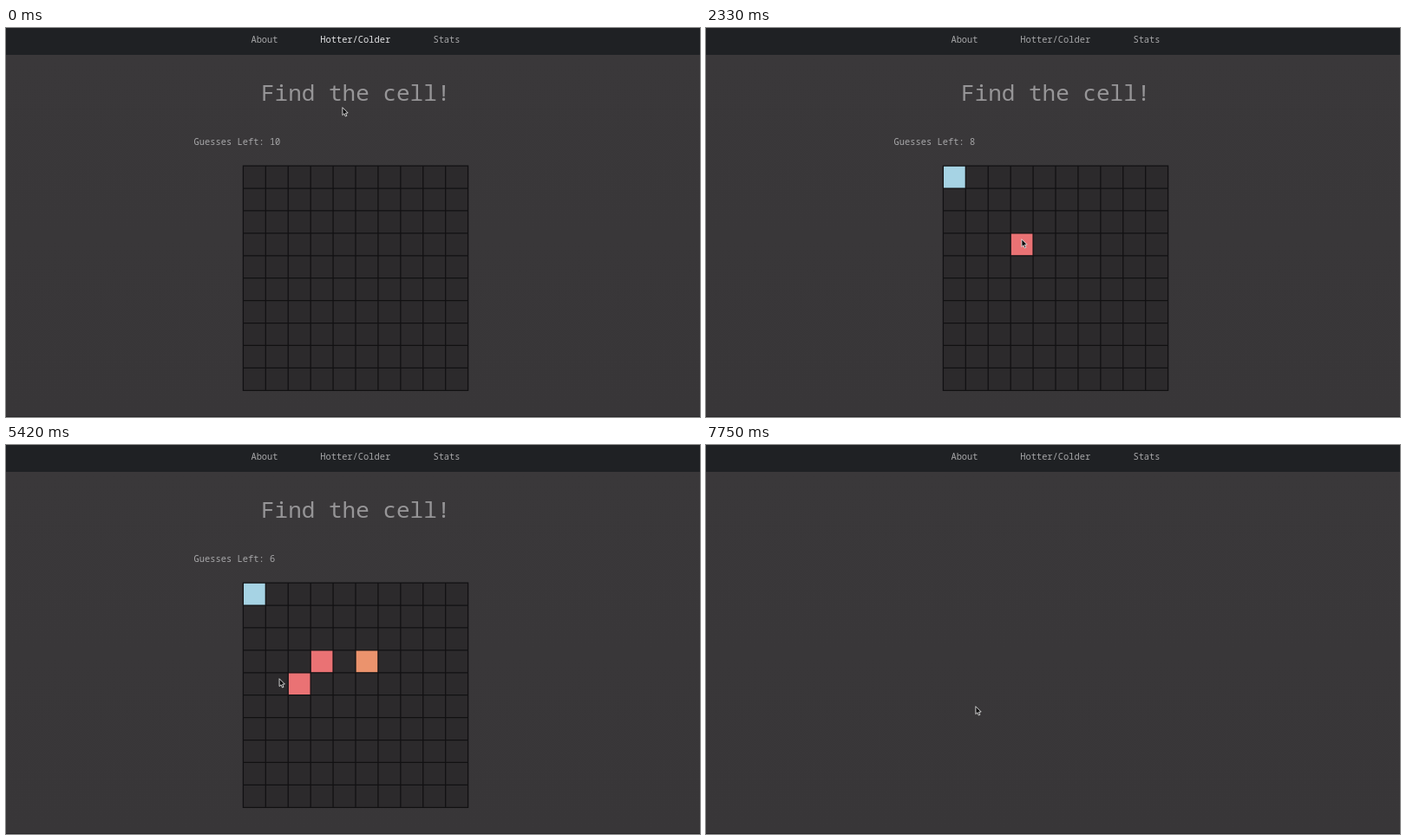
An HTML page with a canvas that plays this animation: 800x449 px, repeating every 8000 ms.

```html
<!DOCTYPE html>
<html lang="en">
<head>
<meta charset="utf-8">
<title>Find the cell!</title>
<style>
  html, body { margin: 0; width: 100%; height: 100%; overflow: hidden; background: #393739; }
  canvas { display: block; }
</style>
</head>
<body>
<canvas id="stage" width="800" height="449"></canvas>
<script>
const ctx = document.getElementById('stage').getContext('2d');
const LOOP = 8000, FPS = 12;
const MOVE = 650, CLICK_DELAY = 250, FADE_START = 7600, FADE_END = 7745;
const GRID = { x: 273.4, y: 159.1, step: 25.92, count: 10 };
const GREY = '#a7a7a9', COLD = '#a6d3e4', WARM = '#eb936d', HOT = '#ea7274', FOUND = '#90e690';

// The pointer glides to each stop; a stop with a colour is clicked after a pause.
const home = { x: 387.5, y: 91 };
const stops = [
  { leave: 80, x: 291, y: 181, color: COLD },
  { leave: 1190, x: 363.5, y: 243, color: HOT },
  { leave: 2460, x: 413.5, y: 241, color: WARM },
  { leave: 3500, x: 332.5, y: 269, color: HOT },
  { leave: 4900, x: 312.5, y: 269, color: HOT },
  { leave: 5750, x: 311.5, y: 300 },
  { leave: 6250, x: 310.5, y: 301, color: FOUND }
];
const clickTime = stop => stop.leave + MOVE + CLICK_DELAY;
const clamp = v => Math.max(0, Math.min(1, v));
const smooth = u => u * u * (3 - 2 * u);
const cellStart = (value, origin) => origin + Math.floor((value - origin) / GRID.step) * GRID.step;

function pointerAt(t) {
  let { x, y } = home;
  for (const stop of stops) {
    const k = smooth(clamp((t - stop.leave) / MOVE));
    x += (stop.x - x) * k;
    y += (stop.y - y) * k;
  }
  return [x, y];
}

function text(str, x, y, size, color, weight = 400) {
  ctx.font = `${weight} ${size}px "Noto Sans Mono", monospace`;
  ctx.fillStyle = color;
  ctx.fillText(str, x, y);
}

function drawPage(t) {
  const bg = ctx.createLinearGradient(0, 31, 0, 449);
  bg.addColorStop(0, '#3a383a');
  bg.addColorStop(1, '#383638');
  ctx.fillStyle = bg;
  ctx.fillRect(0, 0, 800, 449);
  ctx.fillStyle = '#1f2124';
  ctx.fillRect(0, 0, 800, 31);
  ctx.fillStyle = '#29282a';
  ctx.fillRect(0, 448, 800, 1);

  const active = t < clickTime(stops[0]);
  text('About', 282.4, 17, 10.4, GREY, 500);
  text('Hotter/Colder', 362.2, 17, 10.4, active ? '#e4e4e6' : GREY, 500);
  text('Stats', 492.4, 17, 10.4, GREY, 500);
}

function drawGame(t) {
  const { x, y, step, count } = GRID, size = step * count;
  const made = stops.filter(s => s.color && t >= clickTime(s));

  text('Find the cell!', 294, 84, 26, '#969597');
  text('Guesses Left: ' + (10 - made.length), 216.6, 134.5, 10.4, GREY, 500);

  ctx.fillStyle = '#2c2a2c';
  ctx.fillRect(x, y, size, size);
  for (const s of made) {
    ctx.fillStyle = s.color;
    ctx.fillRect(cellStart(s.x, x), cellStart(s.y, y), step, step);
  }
  ctx.beginPath();
  for (let i = 0; i <= count; i++) {
    const d = i * step;
    ctx.moveTo(x + d, y - 0.6);
    ctx.lineTo(x + d, y + size + 0.6);
    ctx.moveTo(x - 0.6, y + d);
    ctx.lineTo(x + size + 0.6, y + d);
  }
  ctx.lineWidth = 1.25;
  ctx.strokeStyle = '#111012';
  ctx.stroke();
}

function drawPointer(x, y) {
  ctx.save();
  ctx.translate(x, y);
  ctx.beginPath();
  [[0.4, 0.7], [0.4, 9.6], [2.4, 7.8], [3.8, 11], [5.3, 10.4], [4, 7.2], [6.7, 7]]
    .forEach(([px, py]) => ctx.lineTo(px, py));
  ctx.closePath();
  ctx.fillStyle = '#0c0c0d';
  ctx.fill();
  ctx.lineWidth = 0.9;
  ctx.lineJoin = 'round';
  ctx.strokeStyle = '#e4e4e4';
  ctx.stroke();
  ctx.restore();
}

function draw(elapsed) {
  const t = Math.floor((elapsed % LOOP + 5) * FPS / 1000) * 1000 / FPS % LOOP;
  drawPage(t);
  ctx.globalAlpha = clamp((FADE_END - t) / (FADE_END - FADE_START));
  drawGame(t);
  ctx.globalAlpha = 1;
  drawPointer(...pointerAt(t));
}

const start = performance.now();
function tick() {
  draw(performance.now() - start);
  requestAnimationFrame(tick);
}
tick();
</script>
</body>
</html>
```
